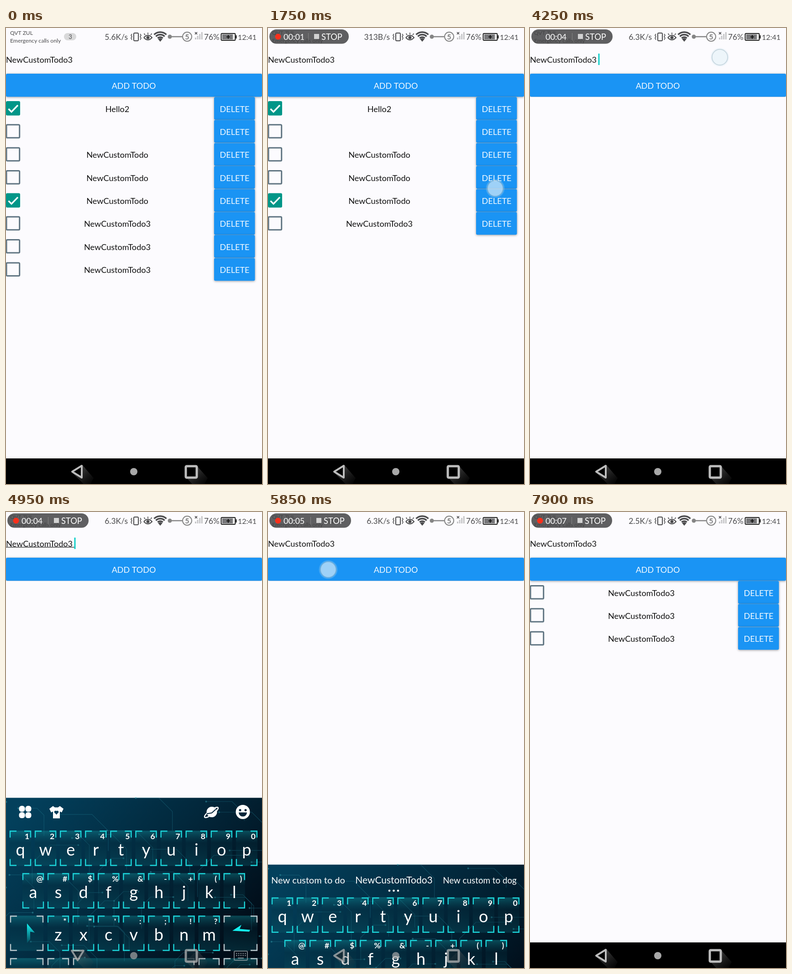
Recreate the animation shown at these times as an HTML page with a canvas. Size 561x998 px, loop 8 s.

```html
<!DOCTYPE html>
<html lang="en">
<head>
<meta charset="utf-8">
<title>Todo list</title>
<style>
html, body { margin: 0; width: 100%; height: 100%; overflow: hidden; background: #fcfbfe; }
canvas { display: block; }
</style>
</head>
<body>
<canvas id="stage" width="561" height="998"></canvas>
<script>
const c = document.getElementById('stage').getContext('2d');
const W = 561, H = 998, LOOP = 8000, NAV = 942;
const BG = '#fcfbfe', BLUE = '#1a94f4', CYAN = '#1cd5da';
const ROW_TOP = 151, PITCH = 50.35;
const KEYS_HEIGHT = 439;

// --- timeline ---
const START_LIST = ['Hello2*', '', 'NewCustomTodo', 'NewCustomTodo', 'NewCustomTodo*',
  'NewCustomTodo3', 'NewCustomTodo3', 'NewCustomTodo3'];
// [time, row to delete, touch y]
const REMOVALS = [[750, 7, 522], [1450, 6, 470], [1850, 4, 351], [2100, 3, 338],
  [2400, 3, 333], [2800, 2, 279], [3250, 1, 229], [3700, 0, 180]];
const ADDS = [6500, 7200, 7700];
const TAPS = [...REMOVALS.map(([t, , y]) => [t - 100, 498, y]),
  [4250, 416, 64], [5800, 132, 126], ...ADDS.map(t => [t - 100, 132, 126])];
const CLOSE = 5770;

const clamp = v => Math.min(1, Math.max(0, v));
const easeOut = p => 1 - (1 - clamp(p)) ** 2;

// --- drawing helpers ---
function text(s, x, y, size, color, align = 'left', weight = 400) {
  c.font = `${weight} ${size}px Lato, sans-serif`;
  c.textAlign = align;
  c.fillStyle = color;
  c.fillText(s, x, y);
}
function box(x, y, w, h, r, fill) {
  c.beginPath();
  c.roundRect(x, y, w, h, r);
  if (fill) { c.fillStyle = fill; c.fill(); }
}
function disc(x, y, r, fill) {
  c.beginPath();
  c.arc(x, y, r, 0, 7);
  c.fillStyle = fill;
  c.fill();
}
function trace(points, close) {
  c.beginPath();
  points.forEach(([x, y]) => c.lineTo(x, y));
  if (close) c.closePath();
}
function line(points, color, width, close) {
  trace(points, close);
  pen(color, width);
}
function poly(points, fill) {
  trace(points, true);
  c.fillStyle = fill;
  c.fill();
}
function pen(color, width) {
  c.strokeStyle = color;
  c.lineWidth = width;
  c.stroke();
}
function raised(x, y, w, h) {
  c.save();
  c.shadowColor = 'rgba(0,0,0,.38)';
  c.shadowBlur = 5;
  c.shadowOffsetY = 1;
  box(x, y, w, h, 3, BLUE);
  c.restore();
}

// --- status bar ---
function statusBar(t) {
  const ink = '#4b4b4d';
  text('QVT ZUL', 9, 15, 12, ink);
  text('Emergency calls only', 9, 32, 12.2, ink);
  box(127, 11, 27, 16, 8, '#d9d9da');
  text('3', 141, 24, 13, ink, 'center');

  const speed = t < 600 ? '5.6K/s' : t < 3600 ? '313B/s' : t < 6600 ? '6.3K/s' : '2.5K/s';
  text(speed, 267, 26, 17.5, ink, 'right');

  box(280, 11, 10, 17, 2);
  pen(ink, 2);
  for (const [x, d] of [[276, -2], [294, 2]])
    line([[x, 13], [x + d, 16], [x, 19], [x + d, 22], [x, 26]], ink, 1.5);

  c.beginPath();
  c.moveTo(302, 21);
  c.quadraticCurveTo(311, 11, 320, 21);
  c.quadraticCurveTo(311, 31, 302, 21);
  pen(ink, 2);
  disc(311, 21, 3.5, ink);
  for (const d of [-6, 0, 6]) line([[311 + d, 14 + Math.abs(d) / 4], [311 + d * 1.4, 10 + Math.abs(d) / 3]], ink, 1.6);

  for (const r of [8, 13.5, 19]) {
    c.beginPath();
    c.arc(338, 28, r, -Math.PI * 0.75, -Math.PI * 0.25);
    pen(ink, 3.5);
  }
  poly([[338, 30], [333, 24], [338, 22], [343, 24]], ink);

  disc(359, 19, 4.5, '#858585');
  line([[359, 19], [386, 19]], '#858585', 2.5);
  c.beginPath();
  c.arc(397, 19, 10, 0, 7);
  pen('#858585', 2);
  text('5', 397, 25, 16, '#777', 'center', 700);

  for (let i = 0; i < 4; i++) {
    c.fillStyle = '#c6c6c8';
    c.fillRect(414 + i * 4.6, 21 - i * 4, 3, 4 + i * 4);
  }
  line([[414, 9], [419, 14]], ink, 1.6);
  line([[419, 9], [414, 14]], ink, 1.6);
  text('76%', 434, 26, 17.2, ink);

  box(471.5, 12, 31, 15, 2, '#e8e8e8');
  pen('#222', 2);
  box(474, 14, 23, 11, 0, '#77777a');
  box(503, 16, 2.5, 7, 0, '#222');
  line([[483, 19.5], [491, 19.5]], '#111', 2);
  line([[487, 15.5], [487, 23.5]], '#111', 2);
  text('12:41', 549, 26, 16, ink, 'right');
}

function recorder(t) {
  if (t < 50) return;
  const phase = t - 250;
  const second = Math.max(0, Math.floor(phase / 1000));
  const dx = [5, 0, 4, 4, 4, 5, 5, 3][second];
  box(3, 3, 174 + dx, 31.5, 15.7, 'rgba(66,66,67,.84)');
  if (phase < 0 || phase % 1000 >= 500) disc(22, 19, 6.5, '#f8301c');
  text('00:0' + second, 34, 26, 18, '#fff');
  box(88 + dx, 11, 1, 16, 0, '#858585');
  box(101 + dx, 13, 11, 11, 0, '#d2d2d2');
  text('STOP', 117 + dx, 26, 18.3, '#fff');
}

// --- todo screen ---
function todosAt(t) {
  const list = [...START_LIST];
  for (const [when, row] of REMOVALS) if (t >= when) list.splice(row, 1);
  for (const when of ADDS) if (t >= when) list.push('NewCustomTodo3');
  return list;
}

function todoRow(item, i) {
  const y = ROW_TOP + i * PITCH;
  const done = item.endsWith('*');
  raised(456, y, 89.5, PITCH - 0.6);
  text('DELETE', 501, y + 32.5, 18.1, '#f4faff', 'center');
  text(item.replace('*', ''), 244, y + 32.5, 18.1, '#111', 'center');
  if (done) {
    box(0, y + 9, 31, 31.5, 3, '#009688');
    line([[5.5, y + 26], [12, y + 32.5], [26, y + 18]], '#fff', 3.4);
  } else {
    box(1, y + 10.5, 28.7, 28.5, 2);
    pen('#607582', 3);
  }
}

function todoScreen(t) {
  const todos = todosAt(t);
  text('NewCustomTodo3', 0, 76, 18.1, '#151515');
  if (t >= 4850 && t < CLOSE) box(0, 76.5, 150, 1.3, 0, '#222');
  if (t >= 4250 && t < 5450) box(149.5, 56, 3, 25, 0, '#12cfc8');

  raised(0, 100, W, 50.5);
  text('ADD TODO', 280, 132.5, 18, '#f4faff', 'center');
  if (!todos.length) box(0, ROW_TOP, W, 10, 0, BG);
  todos.forEach(todoRow);
}

// --- keyboard ---
function key(x, y, w, label, hint, color = CYAN) {
  const h = 77, a = 14;
  const glow = c.createLinearGradient(0, y, 0, y + h);
  glow.addColorStop(0, 'rgba(20,150,160,.42)');
  glow.addColorStop(0.35, 'rgba(5,50,65,.25)');
  glow.addColorStop(1, 'rgba(10,95,110,.35)');
  box(x, y, w, h, 0, glow);
  for (const [cx, sx] of [[x + 1, 1], [x + w - 1, -1]])
    for (const [cy, sy] of [[y + 1, 1], [y + h - 1, -1]])
      line([[cx, cy + a * sy], [cx, cy], [cx + a * sx, cy]], color, 2.4);
  if (label) text(label, x + w / 2, y + 54, 36, '#fff', 'center');
  if (hint) text(hint, x + w - 9, y + 18, 17.5, '#fff', 'center', 700);
}

function circuits() {
  let seed = 11;
  const rnd = () => (seed = seed * 16807 % 2147483647) / 2147483647;
  for (let i = 0; i < 44; i++) {
    let x = rnd() * W, y = rnd() * KEYS_HEIGHT;
    const side = rnd() < 0.5 ? -1 : 1, bend = 12 + rnd() * 30;
    const points = [[x, y], [x += side * (20 + rnd() * 60), y],
      [x += side * bend, y += bend], [x, y + 15 + rnd() * 55]];
    line(points, 'rgba(35,125,145,.38)', 1.2);
    disc(points[0][0], points[0][1], 2, 'rgba(50,160,175,.45)');
  }
}

function stripIcons() {
  for (const dx of [-7, 7]) for (const dy of [-7, 7])
    box(42 + dx - 6.5, 31 + dy - 6.5, 13, 13, 5.5, '#fff');
  poly([[103, 18], [107, 21], [114, 21], [118, 18], [126, 24], [122, 32], [118, 30],
    [118, 45], [103, 45], [103, 30], [99, 32], [95, 24]], '#fff');
  disc(108.5, 31, 2.7, '#03405c');
  disc(112.5, 31, 2.7, '#03405c');
  poly([[106.2, 32], [114.8, 32], [110.5, 37]], '#03405c');
  disc(451, 31, 11.5, '#fff');
  c.beginPath();
  c.ellipse(450, 32, 18, 5, -0.62, 0, 7);
  pen('#fff', 2.5);
  line([[440, 35], [451, 33], [460, 25]], '#02253a', 2);
  disc(519, 31, 15.5, '#fff');
  disc(513, 27, 2.5, '#02253a');
  disc(525, 27, 2.5, '#02253a');
  c.beginPath();
  c.arc(519, 32, 9, 0, Math.PI);
  c.fill();
}

function suggestions() {
  text('New custom to do', 88, 41, 20, '#fff', 'center');
  text('NewCustomTodo3', 276, 41, 21, '#fff', 'center');
  text('New custom to dog', 464, 41, 18.8, '#fff', 'center');
  for (const x of [266, 275.5, 285]) disc(x, 57, 2.3, '#fff');
}

function keyboard(t) {
  const shown = t < CLOSE ? easeOut((t - 4750) / 400) : 1 - easeOut((t - CLOSE) / 250);
  if (shown <= 0) return;
  c.save();
  c.translate(0, H - shown * (H - NAV + KEYS_HEIGHT));
  const g = c.createLinearGradient(0, 60, 420, 440);
  g.addColorStop(0, '#03405c');
  g.addColorStop(0.5, '#02283c');
  g.addColorStop(1, '#010b16');
  box(0, 0, W, KEYS_HEIGHT, 0, g);
  circuits();
  if (t < 5250) stripIcons(); else suggestions();

  const row = (x, y, letters, hints) =>
    [...letters].forEach((ch, i) => key(x + i * 55.1, y, 47, ch, hints[i]));
  row(8, 72, 'qwertyuiop', '1234567890');
  row(36, 165, 'asdfghjkl', '@#$%&-+()');
  row(91, 258, 'zxcvbnm', '*"\':;!?');
  const pale = '#bcc9ce';
  key(9, 258, 73, '', '', pale);
  key(477, 258, 74, '', '', pale);
  for (const [x, w] of [[9, 73], [91, 47], [147, 266], [422, 46], [477, 74]])
    key(x, 351, w, '', '', pale);
  const fade = c.createLinearGradient(0, 276, 0, 318);
  fade.addColorStop(0, '#13efef');
  fade.addColorStop(1, 'rgba(19,239,239,.1)');
  poly([[46, 275], [63, 295], [53, 293], [53, 310], [46, 318]], fade);
  poly([[496, 291], [516, 278], [512, 287], [535, 289], [533, 293]], '#13efef');
  box(0, KEYS_HEIGHT, W, H, 0, '#000');
  c.restore();
}

// --- navigation bar ---
function navIcons(t) {
  const typing = t >= 4600 && t < CLOSE;
  const overKeys = t >= 4750 && t < CLOSE + 250;
  const shade = x => {
    const g = c.createLinearGradient(x, 965, x + 28, 998);
    g.addColorStop(0, 'rgba(110,110,110,.6)');
    g.addColorStop(1, 'rgba(70,70,70,.08)');
    return g;
  };
  c.save();
  c.globalAlpha = overKeys ? 0.7 : 1;
  c.lineJoin = 'round';
  poly([[146, 974], [168, 957], [192, 985], [185, 998], [170, 998]], shade(155));
  poly([[394, 983], [419, 959], [442, 985], [435, 998], [408, 998]], shade(406));
  const arrow = typing ? [[144, 960], [170, 960], [157, 981]] : [[145, 971], [166, 958], [166, 984]];
  poly(arrow, overKeys ? '#10242d' : '#000');
  line(arrow, '#bdbdbd', 4, true);
  box(394, 959, 24, 25, 2, overKeys ? '#10242d' : '#000');
  pen('#bdbdbd', 5);
  disc(280, 971, 8, '#a8a8a8');
  if (typing) {
    box(500, 961, 29, 20, 2);
    pen('#a5adb0', 2);
    for (let i = 0; i < 10; i++) box(504 + i % 5 * 4.8, 965 + Math.floor(i / 5) * 4.5, 2.5, 2.5, 0, '#a5adb0');
    box(508, 975, 13, 2.5, 0, '#a5adb0');
  }
  c.restore();
}

function touches(t) {
  for (const [start, x, y] of TAPS) {
    const age = t - start;
    if (age < 0 || age > 220) continue;
    c.save();
    c.globalAlpha = 1 - clamp((age - 100) / 120);
    disc(x, y, 20.5, 'rgba(200,225,240,.22)');
    disc(x, y, 16.5, 'rgba(236,245,250,.55)');
    c.beginPath();
    c.arc(x, y, 17.2, 0, 7);
    pen('rgba(160,185,197,.5)', 2);
    c.restore();
  }
}

function draw(now) {
  const t = now % LOOP;
  box(0, 0, W, H, 0, BG);
  statusBar(t);
  todoScreen(t);
  box(0, NAV, W, H - NAV, 0, '#000');
  keyboard(t);
  navIcons(t);
  touches(t);
  recorder(t);
}

const origin = performance.now();
function frame() {
  draw(performance.now() - origin);
  requestAnimationFrame(frame);
}
frame();
</script>
</body>
</html>
```
